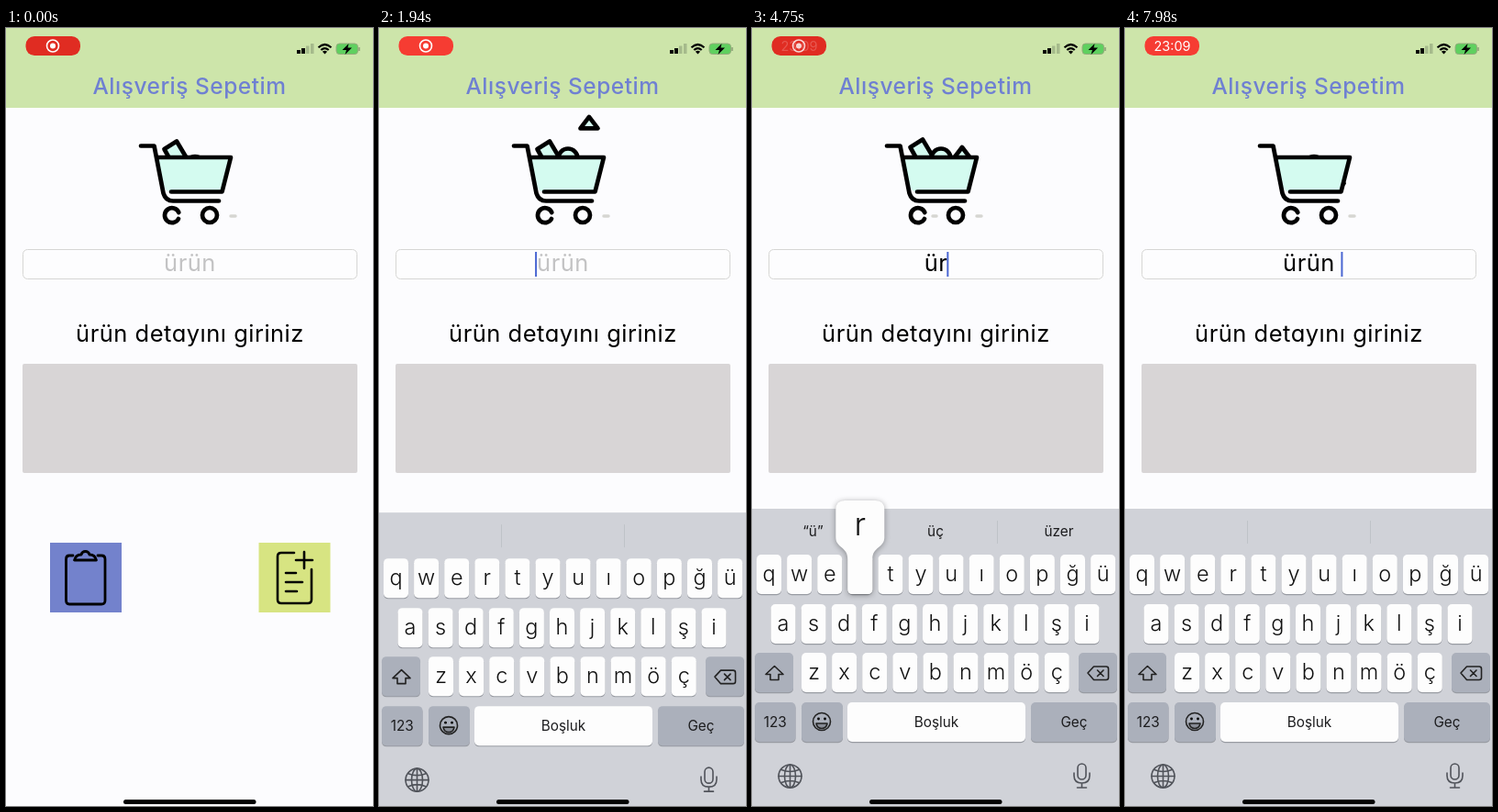
Write an HTML page that moves like this. It is 400 by 848 pixels and loops after 8000 ms.

```html
<!DOCTYPE html>
<html lang="tr">
<head>
<meta charset="utf-8">
<style>
  html, body { margin: 0; width: 100%; height: 100%; overflow: hidden; background: #fcfcfe; }
  svg { display: block; width: 100vw; height: 100vh; }
  text { font-family: Inter, "Open Sans", sans-serif; text-anchor: middle; }
  .app { font-size: 25.5px; letter-spacing: .5px; font-feature-settings: "cv11"; }
  .title { font-size: 24.5px; font-weight: 500; fill: #6f80d2; }
  .ink { fill: none; stroke: #000; stroke-linecap: round; stroke-linejoin: round; }
  .thin { fill: none; stroke: #222; stroke-width: 1.6; stroke-linecap: round; stroke-linejoin: round; }
  .letter { font-size: 23.5px; font-weight: 350; fill: #111; }
  .small { font-size: 15.3px; fill: #1c1c1e; }
  #popup { filter: drop-shadow(0 1px 3px rgba(0, 0, 0, .35)); }
</style>
</head>
<body>
<svg viewBox="0 0 400 848" preserveAspectRatio="none">
  <rect width="400" height="848" fill="#fcfcfe"/>

  <g class="ink" stroke-width="4.7">
    <g fill="#d4fbf0">
      <path id="box" d="M172.500 132L186 123.500L197 142L183 151Z"/>
      <circle id="ball" cx="206" cy="142" r="10.500"/>
      <path id="cone" d="M229 130L238.500 142.500H219.500Z"/>
      <path d="M165 141H245L235.500 178.500H180Q174 178 172.500 174Z" stroke="none"/>
    </g>
    <path d="M147 128.500H161.500L171.500 180Q174 188.500 182 188.500H232M165 141H245L235.500 178.500H180"/>
    <path id="wheel" d="M188.300 201A8 8 0 1 0 188 208"/>
    <circle cx="222" cy="204" r="8"/>
  </g>
  <g stroke="#d6d6d2" stroke-width="3.500" stroke-linecap="round">
    <path d="M245 205H250"/>
    <path id="dashL" d="M153.500 205H154.500"/>
    <path id="dashM" d="M197 205H201"/>
  </g>

  <rect width="400" height="87" fill="#cde5aa"/>
  <text class="app title" x="200" y="71.500">Alışveriş Sepetim</text>

  <rect id="pill" x="21.500" y="9" width="59.500" height="21" rx="9.500"/>
  <g id="rec" fill="#fff">
    <circle cx="51" cy="19.500" r="6.500" fill="none" stroke="#fff" stroke-width="1.600"/>
    <circle cx="51" cy="19.500" r="3"/>
  </g>
  <text id="clock" x="51.500" y="24.500" font-size="14.500" fill="#fff">23:09</text>

  <g>
    <path d="M317 24h4v4h-4zM322 22h4v6h-4z"/>
    <path d="M327 19.500h3.500v8.500h-3.500zM332 17h3.500v11h-3.500z" fill="#a5ba8b"/>
    <path d="M340.500 21.200Q347.500 14.800 354.500 21.200M343.300 24Q347.500 20.200 351.700 24" fill="none" stroke="#000" stroke-width="2.200"/>
    <path d="M347.500 28.500L344.900 25.700Q347.500 23.600 350.100 25.700Z"/>
    <rect x="360" y="17" width="23.500" height="11.500" rx="3.500" fill="#5fd05f" stroke="#94ab7c"/>
    <path d="M385 21V25" stroke="#94ab7c" stroke-width="1.800"/>
    <path d="M373.500 17L366.500 24H371L369.500 29L377 21.500H372.500Z"/>
  </g>

  <rect x="18.500" y="241.500" width="364" height="32" rx="5" fill="#fdfdfe" stroke="#d6d6d4"/>
  <text id="field" class="app" x="200.500" y="265"></text>
  <rect id="caret" y="244" width="2" height="27" fill="#4a66d2"/>
  <text class="app" x="200.500" y="341.500">ürün detayını giriniz</text>
  <rect x="18" y="366" width="365" height="119" rx="2" fill="#d8d5d6"/>

  <rect x="48" y="561" width="78" height="76" fill="#7382cc"/>
  <g class="ink" stroke-width="2.800">
    <path d="M73 575H69Q65.500 575 65.500 579V624Q65.500 628 69 628H104Q108 628 108 624V579Q108 575 104 575H100"/>
    <path d="M74.500 580H98.500Q97 574 91 574Q90 570.500 86.500 570.500T82 574Q76 574 74.500 580Z"/>
  </g>
  <rect x="275.500" y="561" width="78" height="76" fill="#d7e482"/>
  <path class="ink" stroke-width="2.600" d="M314 572H300Q296 572 296 576V623Q296 627 300 627H329Q333 627 333 623V590M325 571V589M316 580H334M305 594H316M305 604H323M305 614H317"/>

  <g id="keyboard">
    <rect y="524" width="400" height="330" fill="#d0d2d8"/>
    <path d="M133.500 537V562M267.500 537V562" stroke="#bfc3c8"/>
    <g id="hints" class="small"></g>
    <g id="keys"></g>
    <path class="thin" d="M24.500 695.500L34 704.500H29V710.500H20V704.500H15Z"/>
    <path class="thin" d="M366 703L372.500 696H386Q388.500 696 388.500 698.500V708Q388.500 710.500 386 710.500H372.500ZM376.500 700L383 706.500M383 700L376.500 706.500"/>
    <g class="thin" stroke-width="1.400">
      <circle cx="76" cy="756" r="9.500"/>
      <path d="M70 758H82Q81 763.500 76 763.500T70 758Z" fill="#888c96"/>
    </g>
    <circle cx="72.500" cy="753" r="1.400"/><circle cx="79.500" cy="753" r="1.400"/>
    <g fill="none" stroke="#50535a" stroke-width="1.600" stroke-linecap="round">
      <circle cx="41.500" cy="815.500" r="12.500"/>
      <ellipse cx="41.500" cy="815.500" rx="6" ry="12.500"/>
      <path d="M41.500 803V828M29 815.500H54M32 808.500Q41.500 812.500 51 808.500M32 822.500Q41.500 818.500 51 822.500"/>
      <rect x="355" y="802" width="9" height="17" rx="4.500"/>
      <path d="M351 812V815Q351 823 359.500 823T368 815V812M359.500 823V828M354.500 828H364.500"/>
    </g>
    <g id="popup">
      <path fill="#fdfdfd"/>
      <text font-size="35" font-weight="350" fill="#111"></text>
    </g>
  </g>
  <rect x="128" y="841" width="144.500" height="5" rx="2.500"/>
</svg>
<script>
const NS = 'http://www.w3.org/2000/svg';
const LOOP = 8000;
const $ = id => document.getElementById(id);
const clamp = v => Math.max(0, Math.min(1, v));
const ramp = (t, a, b) => clamp((t - a) / (b - a));
const smooth = p => p * p * (3 - 2 * p);
const shift = (el, x, y) => el.setAttribute('transform', `translate(${x} ${y})`);

function add(parent, tag, attrs, text) {
  const el = document.createElementNS(NS, tag);
  for (const k in attrs) el.setAttribute(k, attrs[k]);
  if (text) el.textContent = text;
  return parent.appendChild(el);
}

// Keyboard layout
const PITCH = 33.1, KEY_W = 27, KEY_H = 43;
const WHITE = '#fdfdfd', GREY = '#abb0bb';
const keyPos = {};
function addKey(x, y, w, fill, label, cls) {
  add($('keys'), 'rect', { x, y: y + 1.2, width: w, height: KEY_H, rx: 5, fill: '#989ba2' });
  const face = add($('keys'), 'rect', { x, y, width: w, height: KEY_H, rx: 5, fill });
  if (label) add($('keys'), 'text', { x: x + w / 2, y: y + (cls === 'letter' ? 29 : 26.5), class: cls }, label);
  return face;
}
[['qwertyuıopğü', 5, 574], ['asdfghjklşi', 20.5, 628], ['zxcvbnmöç', 54, 681]].forEach(([row, x0, y]) =>
  [...row].forEach((ch, i) => {
    const x = x0 + i * PITCH;
    keyPos[ch] = [x, y];
    addKey(x, y, KEY_W, WHITE, ch, 'letter');
  }));
addKey(3, 681, 42, GREY);
addKey(356, 681, 42, GREY);
addKey(3, 735, 44.5, GREY, '123', 'small');
addKey(54, 735, 45, GREY);
const space = addKey(104, 735, 194, WHITE, 'Boşluk', 'small');
addKey(304, 735, 94, GREY, 'Geç', 'small');
const hints = [66.5, 200, 334.5].map(x => add($('hints'), 'text', { x, y: 553.5 }));

// Each entry starts at its time and holds until the next
const typed = [[0, ''], [4080, 'ü'], [4680, 'ür'], [5850, 'ürü'], [6960, 'ürün'], [7740, 'ürün ']];
const suggest = [[0, []], [4200, ['“ü”', 'üç', 'üzer']], [4850, ['“ür”', 'ürün', 'üret']],
  [6000, ['“ürü”', 'ürün', 'ürünü']], [7080, ['“ürün”', 'ürünü', 'ürünler']], [7780, []]];
const presses = [['ü', 3920, 4240], ['r', 4540, 4880], ['ü', 5720, 6040], ['n', 6820, 7130]];
const current = (list, t) => list.filter(e => e[0] <= t).pop()[1];

function drawPopup(t) {
  const press = presses.find(p => t >= p[1] && t < p[2]);
  $('popup').style.display = press ? '' : 'none';
  if (!press) return;
  const [x, y] = keyPos[press[0]], edge = x > 360;
  const l = x - (edge ? 24 : 13), r = x + KEY_W + (edge ? 0 : 13), top = y - 59, k = x + KEY_W, b = y + KEY_H;
  const [shape, label] = $('popup').children;
  shape.setAttribute('d', `M${l + 10} ${top}H${r - 10}Q${r} ${top} ${r} ${top + 10}V${y - 19}
    C${r} ${y - 7} ${k} ${y - 9} ${k} ${y + 5}V${b - 5}Q${k} ${b} ${k - 5} ${b}H${x + 5}Q${x} ${b} ${x} ${b - 5}
    V${y + 5}C${x} ${y - 9} ${l} ${y - 7} ${l} ${y - 19}V${top + 10}Q${l} ${top} ${l + 10} ${top}Z`);
  label.textContent = press[0];
  label.setAttribute('x', (l + r) / 2);
  label.setAttribute('y', y - 21);
}

function drawCart(t) {
  const sink = smooth(ramp(t, 7300, 7750));
  const lift = -2 * smooth(ramp(t, 3700, 4300)) + 27 * sink;
  const fall = ramp(t, 1700, 2060);
  const bounce = 7 * Math.sin(Math.PI * ramp(t, 2060, 2360));
  const ballLift = 8.5 * (1 - smooth(ramp(t, 20, 300)) + sink);
  shift($('box'), 0, lift);
  shift($('ball'), 0, ballLift);
  shift($('cone'), 0, -60 * (1 - fall * fall) + bounce + 27 * sink);
  $('cone').style.display = fall > 0 ? '' : 'none';
  const turn = -75 * (smooth(ramp(t, 6200, 6800)) - smooth(ramp(t, 7100, 7600)));
  $('wheel').setAttribute('transform', `rotate(${turn} 181 204)`);
  $('dashL').style.opacity = +(t > 3300 && t < 3800);
  $('dashM').style.opacity = +(t > 1100 && t < 1700 || t > 4400 && t < 5100);
}

function drawField(t) {
  const text = current(typed, t), field = $('field');
  const word = text.trim() || 'ürün';
  if (field.textContent !== word) field.textContent = word;
  field.setAttribute('fill', text ? '#000' : '#c3c3c4');
  const half = field.getComputedTextLength() / 2;
  const end = text ? half + (text.endsWith(' ') ? 6.5 : -1) : -half - 2;
  $('caret').setAttribute('x', 200.5 + end);
  const blink = ramp(t, 2400, 2650) - ramp(t, 2950, 3200);
  $('caret').style.opacity = t < 960 ? 0 : 1 - blink;
}

function drawPill(t) {
  const glow = smooth(ramp(t, 200, 1200)) - smooth(ramp(t, 2200, 3300)) + smooth(ramp(t, 4900, 6100));
  $('pill').setAttribute('fill', `rgb(${224 + 22 * glow},${44 + 16 * glow},${34 + 16 * glow})`);
  const swap = ramp(t, 4650, 5150);
  $('rec').style.opacity = 1 - swap;
  $('clock').style.opacity = swap;
}

function draw(t) {
  drawCart(t);
  drawPill(t);
  drawField(t);
  // Critically damped spring
  const s = Math.max(0, t - 992) * 0.0067;
  shift($('keyboard'), 0, 326 * (1 + s) * Math.exp(-s));
  const words = current(suggest, t);
  hints.forEach((el, i) => { el.textContent = words[i] || ''; });
  space.setAttribute('fill', t > 7620 && t < 7790 ? GREY : WHITE);
  drawPopup(t);
}

const start = performance.now();
function tick() {
  draw((performance.now() - start) % LOOP);
  requestAnimationFrame(tick);
}
tick();
</script>
</body>
</html>
```
